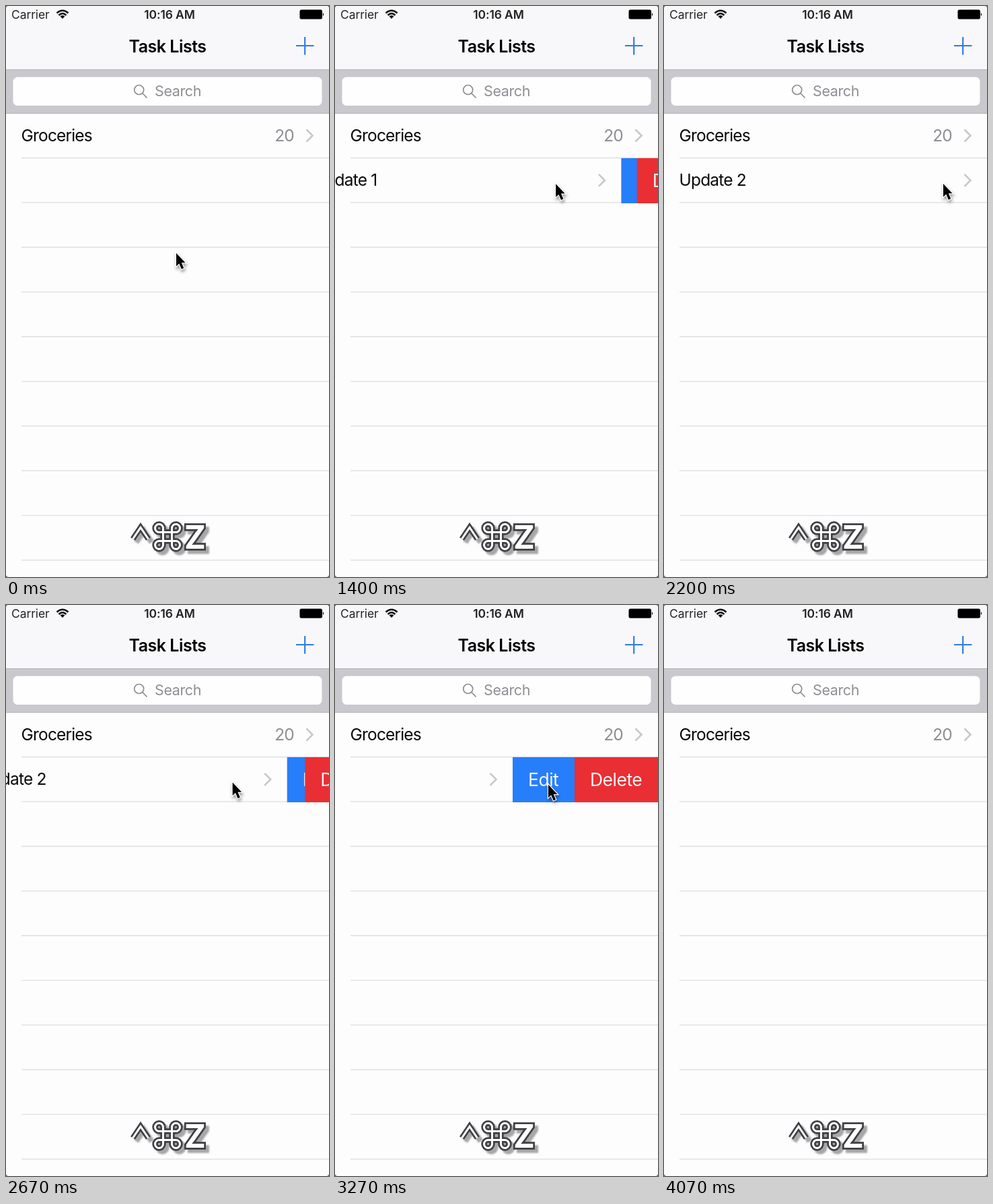
Recreate the animation shown at these times as an HTML page. Size 480 px wide and 848 px high, loop 4390 ms.

```html
<!DOCTYPE html>
<html lang="en">
<head>
<meta charset="utf-8">
<title>Task Lists</title>
<style>
  html, body { margin: 0; width: 100%; height: 100%; overflow: hidden; background: #5c5c60; }
  svg { display: block; width: 480px; height: 848px; }
  text { font-family: Inter, Roboto, sans-serif; white-space: pre; }
  .status { font-size: 17.5px; letter-spacing: -.1px; fill: #222; }
  .bold { font-weight: 600; }
  .title { font-size: 25px; letter-spacing: -.5px; }
  .cell { font-size: 24.5px; letter-spacing: -.8px; fill: #080808; }
  .muted { fill: #8e8e93; }
  .search { font-size: 21.5px; letter-spacing: -.4px; }
  .action { font-size: 26.5px; letter-spacing: -.5px; fill: #f6f4f8; }
  .line { fill: none; stroke: #c7c7cc; stroke-width: 2.6; }
  .keys { filter: drop-shadow(5px 5px 1px rgba(0, 0, 0, .34)); }
  .outer { fill: none; stroke: #403f44; stroke-width: 8.4; }
  .inner { fill: none; stroke: #fff; stroke-width: 3; }
  .pointer { filter: drop-shadow(1px 3px 2px rgba(0, 0, 0, .4)); }
</style>
</head>
<body>
<svg viewBox="0 0 480 848">
  <defs>
    <clipPath id="screen"><rect width="480" height="848" rx="4"/></clipPath>
    <path id="chevron" class="line" d="M446.5 183.5L455.5 192.5L446.5 201.5"/>
    <path id="caret" d="M188.500 791.500L200 774.500L211.500 791.500"/>
    <path id="command" transform="translate(240 788)"
      d="M-6.5-12.5A6 6 0 1 0-12.5-6.5H12.5A6 6 0 1 0 6.5-12.5V12.5A6 6 0 1 0 12.5 6.5H-12.5A6 6 0 1 0-6.5 12.5Z"/>
  </defs>
  <g clip-path="url(#screen)">
    <rect width="480" height="848" fill="#fefdfe"/>
    <rect width="480" height="94" fill="#f8f8fa"/>

    <text class="status" x="8" y="19">Carrier</text>
    <g fill="none" stroke="#111" stroke-width="2.6">
      <path d="M75.500 10.500Q84 3 92.500 10.500M78.500 13.700Q84 8.700 89.500 13.700"/>
      <path d="M80.500 15.300Q84 12.500 87.500 15.300L84 19Z" fill="#111" stroke="none"/>
    </g>
    <text class="status bold" x="243" y="19" text-anchor="middle">10:16 AM</text>
    <rect x="436.500" y="5.500" width="33.500" height="14" rx="2.500"/>
    <path d="M471 10Q473.500 12.500 471 15Z"/>

    <text class="title bold" x="240" y="69" text-anchor="middle">Task Lists</text>
    <path d="M431 59H457.500M444.200 46V72.500" stroke="#2f7de1" stroke-width="2.200"/>

    <rect y="94" width="480" height="66" fill="#c9c8cd"/>
    <path d="M0 94.500H480M0 159.500H480" stroke="#b3b2b7" stroke-width="1.200"/>
    <rect x="10.500" y="105.500" width="459" height="42.500" rx="6.500" fill="#fefefe"/>
    <g fill="none" stroke="#8e8e93" stroke-width="1.700">
      <circle cx="197.700" cy="124.500" r="7"/>
      <path d="M202.700 129.500L209.500 136.300"/>
    </g>
    <text class="search muted" x="221" y="134">Search</text>

    <text class="cell" x="22.500" y="201">Groceries</text>
    <text class="cell muted" x="428" y="201" text-anchor="end">20</text>
    <use href="#chevron"/>

    <g id="row">
      <g id="content">
        <text id="label" class="cell" x="22.500" y="267">Update 1</text>
        <use href="#chevron" y="66.400"/>
      </g>
    </g>
    <path id="separators" stroke="#e2e1e6" stroke-width="1.600"/>
    <g id="actions">
      <g id="edit">
        <rect y="226" width="230" height="67" fill="#277efb"/>
        <text class="action" x="23" y="268.500">Edit</text>
      </g>
      <g id="delete">
        <rect y="226" width="130" height="67" fill="#e92f33"/>
        <text class="action" x="23" y="268.500">Delete</text>
      </g>
    </g>

    <g class="keys">
      <use href="#caret" class="outer"/>
      <use href="#caret" class="inner"/>
      <use href="#command" class="outer"/>
      <use href="#command" class="inner"/>
      <text x="265" y="806" font-size="48" font-weight="700" fill="#fff" stroke="#403f44"
        stroke-width="5.500" paint-order="stroke">Z</text>
    </g>

    <g id="cursor" class="pointer">
      <path d="M0 0V19.500L4.300 15.600L7.800 23.800L11.200 22.300L7.800 14.300H13.500Z"
        stroke="#fff" stroke-width="2.400" paint-order="stroke"/>
    </g>
  </g>
</svg>
<script>
  const LOOP = 4390, TICK = 200 / 3;
  const ADDED = 600, RENAMED = 2200, DELETED = 3470;
  const FULL = 216, DELETE_WIDTH = 124;

  // [time, x, y]
  const pointerTrack = [
    [0, 253, 367], [600, 253, 367], [930, 277, 322], [1200, 385, 268], [1270, 385, 269],
    [1670, 156, 250], [1800, 152, 254], [2070, 308, 270], [RENAMED - 20, 308, 270],
    [RENAMED, 415, 264], [2530, 415, 264], [2930, 137, 262], [3070, 137, 264],
    [3400, 411, 268], [3530, 411, 264], [3600, 409, 268], [3940, 298, 856]
  ];
  // [time, distance the row is pulled left]
  const swipeTrack = [
    [0, 0], [1270, 0], [1670, 220], [1800, FULL], [RENAMED - 20, FULL],
    [RENAMED, 0], [2530, 0], [2930, 221], [3070, FULL]
  ];

  const el = id => document.getElementById(id);
  const move = (id, x, y = 0) => el(id).setAttribute("transform", `translate(${x} ${y})`);
  const show = (id, on) => el(id).setAttribute("visibility", on ? "visible" : "hidden");

  function sample(track, time) {
    const next = track.findIndex(key => key[0] > time);
    if (next < 0) return track[track.length - 1].slice(1);
    const from = track[next - 1], to = track[next];
    const p = (time - from[0]) / (to[0] - from[0]);
    const eased = p * p * (3 - 2 * p);
    return from.slice(1).map((v, i) => v + (to[i + 1] - v) * eased);
  }

  function draw(now) {
    const tick = Math.floor((now % LOOP + 4) / TICK);
    const time = Math.round(tick * TICK / 10) * 10;
    const [pull] = sample(swipeTrack, time);
    const open = Math.min(pull, FULL);
    const present = time >= ADDED && time < DELETED;

    show("row", present);
    show("actions", present && open > 0);
    el("label").textContent = time < RENAMED ? "Update 1" : "Update 2";
    move("content", -pull);
    move("edit", 480 - open);
    move("delete", 480 - open * DELETE_WIDTH / FULL);
    move("cursor", ...sample(pointerTrack, time));
  }

  el("separators").setAttribute("d",
    Array.from({ length: 10 }, (_, i) => `M23 ${225.6 + i * 66.37}H480`).join(""));

  const start = performance.now();
  function loop() {
    draw(performance.now() - start);
    requestAnimationFrame(loop);
  }
  loop();
</script>
</body>
</html>
```
